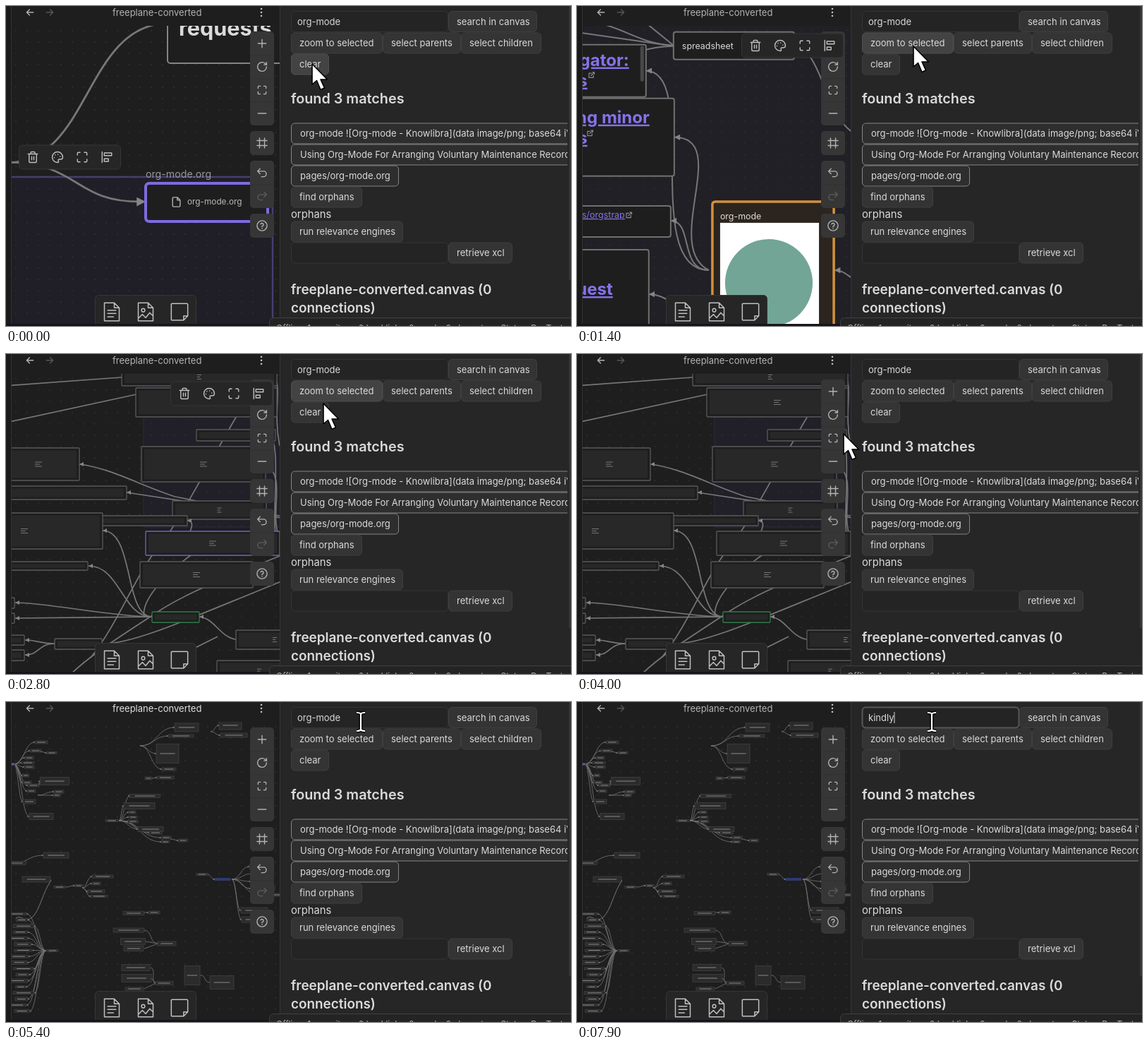
An HTML page that plays this animation: 801x453 px, repeating every 8000 ms.

```html
<!DOCTYPE html>
<html lang="en">
<head>
<meta charset="utf-8">
<title>Canvas search</title>
<style>
html, body { margin: 0; width: 801px; height: 453px; overflow: hidden; background: #1e1e1e; }
svg { display: block; }
text { font-family: Inter, sans-serif; font-size: 13px; fill: #dadada; white-space: pre; }
.edge { fill: none; stroke: #777; }
</style>
</head>
<body>
<svg id="stage" width="801" height="453" viewBox="0 0 801 453"></svg>
<script>
const LOOP = 8000;
const $ = id => document.getElementById(id);

// ---- drawing helpers ----
const rect = (x, y, w, h, fill, stroke = 'none', r = 0, sw = 1, extra = '') =>
  `<rect x="${x}" y="${y}" width="${w}" height="${h}" rx="${r}" fill="${fill}" stroke="${stroke}" stroke-width="${sw}" ${extra}/>`;
const text = (x, y, s, size = 13, fill = '#dadada', extra = '') =>
  `<text x="${x}" y="${y}" style="font-size:${size}px;fill:${fill}" ${extra}>${s}</text>`;
const edge = (d, w = 2) => `<path class="edge" d="${d}" stroke-width="${w}"/>`;
const head = (x, y, dir, size = 5) =>
  `<path d="M${x} ${y}l${-dir * size * 1.5} ${-size * .75}v${size * 1.5}z" fill="#858585"/>`;
const group = (id, body, extra = '') => `<g id="${id}" ${extra}>${body}</g>`;

// ---- icons, drawn in a 24 unit box ----
const ICONS = {
  plus: 'M4 12H20M12 4V20',
  minus: 'M4 12H20',
  reload: 'M21 12A9 9 0 1 1 18 5.3L21 8M21 3V8H16',
  fit: 'M3 8V5Q3 3 5 3H8M16 3H19Q21 3 21 5V8M21 16V19Q21 21 19 21H16M8 21H5Q3 21 3 19V16',
  grid: 'M7 2V22M17 2V22M2 7H22M2 17H22',
  undo: 'M8 14L3 9L8 4M3 9H15A5.5 5.5 0 0 1 15 20H11',
  redo: 'M16 14L21 9L16 4M21 9H9A5.5 5.5 0 0 0 9 20H13',
  help: 'M2 12A10 10 0 1 0 22 12A10 10 0 1 0 2 12M9 9A3 3 0 1 1 12 13V14M12 17V17.5',
  trash: 'M3 6H21M19 6V20Q19 22 17 22H7Q5 22 5 20V6M8 6V4Q8 2 10 2H14Q16 2 16 4V6M10 11V17M14 11V17',
  palette: 'M12 2A10 10 0 0 0 12 22C15 22 14 20 13.5 18.5C13 16.5 14 16 16 16H18C20 16 22 14.5 22 12A10 10 0 0 0 12 2M13 6.5V7M17 10.5V11M8 7.5V8M6 12.5V13',
  align: 'M3 2V22M7 4H21V9H7ZM7 15H15V20H7Z',
  back: 'M20 12H4M11 5L4 12L11 19',
  next: 'M4 12H20M13 5L20 12L13 19',
  file: 'M14 2H6Q4 2 4 4V20Q4 22 6 22H18Q20 22 20 20V8ZM14 2V8H20',
  doc: 'M15 1H3V23H21V7ZM15 1V7H21M7 10H17M7 14H17M7 18H14',
  image: 'M15 1H3V23H21V7ZM15 1V7H21M3 20L8 15L12 19L17 13L21 17M7 10A2 2 0 1 0 11 10A2 2 0 1 0 7 10',
  card: 'M3 2H21Q22 2 22 3V17L17 22H3Q2 22 2 21V3Q2 2 3 2M22 17H17V22',
  link: 'M18 13V21H3V6H11M15 3H21V9M21 3L10 14'
};
const icon = (name, cx, cy, size = 17, color = '#b3b3b3', w = 1.4) => {
  const k = size / 24;
  return `<path d="${ICONS[name]}" transform="translate(${cx - size / 2} ${cy - size / 2}) scale(${k})" fill="none"
    stroke="${color}" stroke-width="${w / k}" stroke-linecap="round" stroke-linejoin="round"/>`;
};

// ---- side panel ----
const button = (x, y, w, label, id = '') =>
  rect(x + .5, y + .5, w - 1, 29, '#343434', '#3f3f3f', 5, 1, id && `id="${id}"`) + text(x + 12, y + 19.5, label);
const field = (y, id) => rect(404.5, y + .5, 222, 29, '#242424', '#343434', 5, 1, `id="${id}"`);
const result = (y, w, label) =>
  rect(404.5, y + .5, w, 29, '#2e2e2e', '#858585', 5) + text(417, y + 19.5, label);

function panel() {
  return rect(388, 0, 413, 453, '#262626') + rect(388, 0, 1, 453, '#363636') + rect(798, 0, 3, 388, '#353535') +
    field(7, 'query') + text(413, 26.5, '', 13, '#dadada', 'id="typed"') +
    rect(0, 14, 1, 16, '#dadada', 'none', 0, 0, 'id="caret"') +
    button(627, 7, 126, 'search in canvas') +
    button(404, 37.5, 130, 'zoom to selected', 'zoomBtn') +
    button(534, 37.5, 111, 'select parents') + button(645, 37.5, 114, 'select children') +
    button(404, 67.5, 54, 'clear', 'clearBtn') +
    text(404, 138, 'found 3 matches', 19.8, '#dadada', 'font-weight="600"') +
    `<g clip-path="url(#rows)">` +
    result(165.5, 420, 'org-mode ![Org-mode - Knowlibra](data image/png; base64 iV') +
    result(195.5, 420, 'Using Org-Mode For Arranging Voluntary Maintenance Records Overview') +
    result(225.5, 152, 'pages/org-mode.org') + '</g>' +
    button(404, 255.5, 101, 'find orphans') + text(404, 300, 'orphans', 14.8) +
    button(404, 304.5, 159, 'run relevance engines') +
    field(334.5, 'second') + button(627, 334.5, 91, 'retrieve xcl') +
    text(404, 408, 'freeplane-converted.canvas (0', 18.9, '#dadada', 'font-weight="600"') +
    text(404, 434, 'connections)', 18.9, '#dadada', 'font-weight="600"') +
    rect(0, 450, 801, 3, '#17131a') +
    rect(373.5, 441.5, 440, 30, '#242424', '#404040', 6) +
    text(383, 460, 'Offline  1 repository  0 backlinks  0 words  0 characters  Status: Re  Test', 12, '#b3b3b3');
}

// ---- canvas controls ----
function chrome() {
  const block = (y, h) => rect(346, y, 34, h, '#363636', 'none', 5);
  const pad = [['plus', 53], ['reload', 86], ['fit', 119], ['minus', 152], ['grid', 194], ['undo', 236], ['redo', 269], ['help', 311]];
  const lines = [69.5, 102.5, 135.5, 252.5].map(y => rect(346, y, 34, 1, '#303030')).join('');
  return block(36, 133) + block(177, 34) + block(219, 67) + block(294, 34) + lines +
    pad.map(([n, y]) => icon(n, 363, y, n === 'fit' ? 15 : 17, n === 'redo' ? '#5c5c5c' : '#b3b3b3')).join('') +
    rect(126.5, 409.5, 143, 50, '#262626', '#363636', 5) +
    ['doc', 'image', 'card'].map((n, i) => icon(n, 150 + 48 * i, 433, 28, '#c0c0c0', 1.5)).join('');
}
const menu = (id, x, y) => group(id, rect(x + .5, y + .5, 144, 34, '#262626', '#363636', 5) +
  ['trash', 'palette', 'fit', 'align'].map((n, i) => icon(n, x + 20 + 35 * i, y + 17.5, 18, '#c0c0c0')).join(''));

const titleBar = () => rect(0, 0, 388, 28, '#1e1e1e') + icon('back', 34, 9, 14) + icon('next', 62, 9, 14, '#555') +
  text(151, 14, 'freeplane-converted', 13, '#b3b3b3', 'id="title"') +
  [4, 9, 14].map(y => `<circle cx="362" cy="${y}" r="1.3" fill="#c0c0c0"/>`).join('');

// ---- canvas scenes ----
function sceneNode() {
  return rect(-20, 242, 398, 260, '#201f27', '#453f70', 0, 2.5) + rect(-20, 242, 398, 260, 'url(#dots)') +
    edge('M0 222C120 222 110 28 229 24', 2.8) + edge('M0 221C105 222 95 277 190 277', 2.8) + head(198, 277, 1, 8.5) +
    rect(229, -30, 220, 111, '#1e1e1e', '#858585', 4, 2) +
    text(245, 42, 'requests', 30.6, '#dadada', 'font-weight="700"') +
    text(198, 243, 'org-mode.org', 14.2, '#999') +
    rect(198, 251, 173, 54, '#1e1e1e', '#7f6ae0', 5, 4) +
    icon('file', 241.5, 277.5, 16) + text(257, 281, 'org-mode.org', 11.8, '#b8b8b8');
}

function sceneCards() {
  const box = (x, y, w, h) => rect(x, y, w, h, '#1e1e1e', '#707070', 3, 2);
  const link = (x, y, s, size, weight = 700) =>
    text(x, y, s, size, '#8672ea', `text-anchor="end" text-decoration="underline" font-weight="${weight}"`);
  const out = (x, y) => icon('link', x, y, 10, '#8a8a8a', 1.2);
  const join = ['M98 92C175 92 90 374 187 374', 'M138 186C220 186 120 340 187 374', 'M133 304C165 304 145 374 187 374',
    'M102 408C120 408 130 418 145 425', 'M365 374C380 374 385 385 400 390', 'M308 57C350 62 350 165 400 184',
    'M-10 20C60 20 80 54 137 56', 'M-10 36L137 57', 'M-10 85C60 84 80 58 137 57', 'M90 18L137 56'];
  const tips = [[98, 92], [138, 186], [133, 304], [102, 408], [365, 374]];
  return rect(-400, -400, 1300, 1300, '#202026') + rect(-400, -400, 1300, 1300, 'url(#dots)') +
    join.map(d => edge(d)).join('') + tips.map(([x, y]) => head(x, y, -1, 5.5)).join('') +
    box(137, 37, 171, 39) + text(149, 61, 'spreadsheet', 12.4) +
    box(-80, 55, 178, 74) + rect(90, 57, 5, 50, '#484848', 'none', 2) +
    link(74, 85, 'gator:', 24) + link(15, 114, 's', 24) + out(21, 98) +
    box(-80, 131, 218, 110) + link(103, 166, 'ng minor', 24) + link(15, 195, 's', 24) + out(19, 180) +
    box(-80, 283, 213, 44) + link(68, 300, 's/orgstrap', 12.5, 400) + out(74, 296) +
    box(-80, 345, 182, 130) + link(51, 409, 'uest', 24) +
    rect(192, 277, 172, 220, '#2c251f', '#d3903c', 4, 3.5) + text(203, 302, 'org-mode', 12.4) +
    rect(203, 307, 140, 180, '#fff') + '<circle cx="272" cy="392" r="62" fill="#72a596"/>';
}

function sceneMap() {
  const boxes = [[164, 20, 220, 25], [184, 48, 200, 41], [270, 107, 112, 16], [192, 131, 176, 50], [-60, 133, 164, 46, 46],
    [-60, 187, 231, 19], [236, 208, 133, 26], [120, 229, 137, 14], [-60, 225, 197, 51, 26], [190, 294, 160, 37], [-60, 294, 176, 12],
    [-60, 345, 72, 15], [-60, 367, 72, 14], [-60, 398, 86, 14], [-60, 419, 86, 15], [69, 403, 67, 15], [326, 391, 110, 27], [299, 434, 120, 30]];
  const card = ([x, y, w, h, mid = x + w / 2], stroke = '#5a5a5a', id = '') => {
    const c = y + h / 2, n = h > 30 ? 5 : 3;
    return rect(x, y, w, h, '#1e1e1e', stroke, 1, 1.3, id && `id="${id}"`) + rect(x + 4, y + 3.5, w - 8, h - 7, '#282828') +
      (h > 20 ? edge(`M${mid - n} ${c - 3}h${n * 2}m${-n * 2} 3h${n * 1.4}m${-n * 1.4} 3h${n * 2}`, 1) : '');
  };
  const hub = [[117, 300], [137, 250], [13, 352], [13, 374]];
  const lines = ['M0 45L164 33', 'M0 97L190 56', 'M104 156C150 162 190 186 240 202L390 232', 'M171 196L388 229', 'M388 264C370 270 395 120 372 114',
    'M257 236C266 236 264 244 261 251', 'M69 410C48 410 45 405 27 405', 'M69 410C45 410 48 426 27 426', 'M274 372C296 374 302 400 326 404',
    'M90 455C120 425 170 395 215 365S330 310 390 285', 'M120 430C160 380 185 310 215 275S290 150 327 88',
    'M196 372C190 345 240 300 262 285', 'M136 410C180 412 270 370 390 322', 'M380 30C392 50 378 80 388 130', 'M368 156C400 175 370 230 390 265', 'M190 455L300 400'];
  const tips = [...hub, [104, 156], [171, 196], [27, 405], [27, 426], [274, 372], [257, 236]];
  return rect(195, 30, 230, 215, '#211f28', '#2e2b3c') + rect(195, 30, 230, 215, 'url(#dots)') +
    group('mapEdges', lines.map(d => `<path class="edge" d="${d}"/>`).join('') +
      hub.map(([x, y]) => `<path class="edge" d="M207 372C${150 + x / 8} 372 ${x + 45} ${y} ${x} ${y}"/>`).join('')) +
    boxes.map(b => card(b)).join('') + card([198, 251, 190, 34], '#7362d0', 'picked') + card([207, 365, 67, 15], '#2f7d4a') +
    group('mapTips', tips.map(([x, y]) => head(x, y, -1, 4)).join(''));
}

function sceneFar() {
  const chip = ([x, y, w = 12, h = 4], fill = '#2b2b2b') =>
    rect(x - w / 2, y - h / 2, w, h, fill, '#4a4a4a', 0, .6) + rect(x - w * .33, y - .4, w * .66, .8, '#a0a0a0');
  const chips = list => list.map(n => chip(n)).join('');
  const fan = (x, y, list) => list.map(n => {
    const end = n[0] + (n[0] > x ? -1 : 1) * (n[2] || 12) / 2, m = (x + end) / 2;
    return edge(`M${x} ${y}C${m} ${y} ${m} ${n[1]} ${end} ${n[1]}`, .8) + head(end, n[1], n[0] > x ? 1 : -1, 1.5);
  }).join('') + chips(list);
  // ragged column of nodes at the lower left
  const column = Array.from({ length: 17 }, (_, i) =>
    [14 + 11 * Math.abs(Math.sin(i * 2.3)), 300 + i * 8.6, 14 + 16 * Math.abs(Math.cos(i * 1.7)), 3 + i % 3]);
  return fan(11, 88, [[50, 57, 18], [42, 69, 16], [33, 79], [31, 86, 18, 3], [33, 92, 14], [28, 104, 9], [30, 114], [39, 118, 16], [36, 126], [33, 141, 18, 6], [50, 162, 34, 9]]) +
    fan(48, 70, [[65, 72, 14, 3]]) + fan(46, 118, [[69, 112, 41, 11]]) + fan(45, 132, [[75, 127, 14], [72, 132, 10]]) + chip([8, 88, 10, 3], '#30408f') +
    fan(190, 62, [[256, 36, 34, 12], [248, 48, 36], [229, 73, 32, 27], [231, 95, 20]]) +
    fan(290, 42, [[318, 33, 32, 12], [323, 47, 38, 6]]) + fan(206, 108, [[226, 107, 24]]) + chip([202, 108, 10]) +
    fan(160, 168, [[197, 133, 43, 5], [189, 147, 44, 9], [179, 156, 10], [180, 163, 12, 3], [180, 169, 14], [205, 180, 36, 7], [212, 185, 18], [227, 192, 14], [226, 198, 11, 3]]) +
    chip([150, 168, 18, 3]) + fan(233, 194, [[251, 196, 13, 4]]) +
    fan(8, 229, [[71, 217, 36, 8]]) + chip([15, 228, 26, 5]) + chip([43, 251, 40, 8]) +
    edge('M64 252C52 270 48 294 38 304S20 300 14 306', 1) + fan(84, 262, [[103, 260, 11, 3]]) + chip([76, 262, 16, 3]) +
    fan(108, 263, [[137, 247, 30], [128, 257], [128, 268, 24], [132, 275, 24, 3]]) +
    fan(285, 244, [[307, 251, 22, 3]]) + chip([278, 244, 16, 3]) +
    fan(320, 251, [[360, 233, 30, 6], [364, 243, 30, 5], [362, 254, 30], [364, 264, 34, 6], [376, 273, 36], [352, 295, 38, 8], [350, 308, 32, 8]]) +
    rect(296, 249.5, 22, 3, '#26398c') + fan(190, 298, [[210, 298, 16]]) + chip([181, 299, 30, 5]) +
    edge('M196 323C208 324 203 342 216 342M198 339L216 342M196 349L216 342', .8) +
    chips([[174, 323, 44, 6], [180, 339, 35, 9], [181, 349, 28, 7], [228, 342, 26, 6]]) +
    chips([[184, 376, 40, 9], [185, 391, 42, 11], [224, 398, 26, 5], [182, 406, 26]]) +
    edge('M205 376C214 378 204 397 212 398M206 391L212 398M196 406L212 398', .8) +
    edge('M275 387C284 386 280 397 289 397', .8) + chip([264, 387, 22, 27]) + chip([306, 397, 34, 19]) +
    fan(57, 352, column) + chip([66, 352, 16, 3]);
}

// ---- pointers ----
const bar = 'M-6 -13Q-1 -13 0 -11Q1 -13 6 -13M0 -11V11M-6 13Q-1 13 0 11Q1 13 6 13';
const pointer = group('arrow', '<path d="M0 0V29L6.5 23.5L12 36.5L17.5 34L12 22H21.5Z" fill="#fff" stroke="#000" stroke-width="1.6" stroke-linejoin="round"/>') +
  group('beam', `<path d="${bar}" fill="none" stroke="#000" stroke-width="5"/><path d="${bar}" fill="none" stroke="#fff" stroke-width="2.2"/>`,
    'transform="translate(503 28)"');

$('stage').innerHTML = `<defs>
  <clipPath id="view"><rect x="8" y="28" width="380" height="425"/></clipPath>
  <clipPath id="rows"><rect x="404" y="160" width="392" height="100"/></clipPath>
  <pattern id="dots" x="12" y="33" width="16" height="16" patternUnits="userSpaceOnUse"><circle cx="2" cy="2" r=".9" fill="#303030"/></pattern></defs>` +
  rect(0, 0, 801, 453, '#1e1e1e') +
  group('canvas', rect(8, 28, 380, 425, 'url(#dots)') + group('node', sceneNode()) + group('cards', sceneCards()) +
    group('map', sceneMap()) + group('far', sceneFar()) + chrome() + menu('menuLow', 18, 196.5) + menu('menuHigh', 233, 38.5), 'clip-path="url(#view)"') +
  titleBar() + rect(0, 0, 7, 453, '#1a1a1a') + rect(7, 0, 1, 453, '#333') + panel() + pointer;

// ---- motion ----
const lerp = (a, b, k) => a + (b - a) * k;
function track(t, keys) {
  const i = keys.findIndex(k => k[0] > t);
  if (i < 0) return keys[keys.length - 1].slice(1);
  if (i === 0) return keys[0].slice(1);
  const a = keys[i - 1], b = keys[i], k = (t - a[0]) / (b[0] - a[0]);
  return a.slice(1).map((v, j) => lerp(v, b[j + 1], k));
}
const POINTER = [[300, 434, 82], [900, 477, 57], [2700, 477, 57], [2800, 450, 70], [3000, 434, 80], [3600, 434, 80],
  [4000, 378, 113], [4300, 262, 113], [4500, 262, 113], [4900, 384, 70], [5000, 384, 70], [5300, 490, 28]];
// log2 of the scale, then the place of the hub node
const CAMERA = [[1400, 1.38, 278, 374], [2000, .1, 227.5, 391.2], [2400, 0, 240, 372], [4500, 0, 240, 372],
  [4900, -1.5, 100, 358], [5000, -1.5, 100, 358], [5400, -2, 66, 352]];
const TYPING = [[0, 'org-mode'], [6700, 'org-'], [6900, 'org'], [7000, ''], [7300, 'k'], [7400, 'ki'],
  [7600, 'kin'], [7700, 'kind'], [7800, 'kindl'], [7900, 'kindly']];

const show = (id, on) => $(id).style.display = on ? '' : 'none';
const place = (id, s, x, y, ax, ay) => $(id).setAttribute('transform', `translate(${x - ax * s} ${y - ay * s}) scale(${s})`);
const paint = (id, fill, stroke) => { $(id).setAttribute('fill', fill); $(id).setAttribute('stroke', stroke); };
const hover = (id, on) => paint(id, on ? '#434343' : '#343434', on ? '#505050' : '#3f3f3f');

function draw(t) {
  const [zoom, hx, hy] = track(t, CAMERA), s = 2 ** zoom;
  const slide = track(t, [[1000, 0], [1400, 1]])[0], q = slide * (2 - slide);
  show('node', t < 1400);
  $('node').setAttribute('transform', `translate(${-400 * q} 0)`);
  show('cards', t >= 1100 && t < 1700);
  place('cards', s / 2.6, hx + 400 * (1 - q), hy, 278, 374);
  show('map', t >= 1700 && s > .5);
  place('map', s, hx, hy, 240, 372);
  show('far', t >= 4600 && s <= .5);
  place('far', s * 4, hx, hy, 66, 352);

  const settled = t >= 2400;
  $('mapEdges').setAttribute('stroke-width', settled ? 1.7 : 1);
  show('mapTips', settled);
  $('picked').setAttribute('stroke', t < 3400 ? '#7362d0' : '#5a5a5a');
  show('menuLow', t < 1100);
  show('menuHigh', t >= 1100 && t < 3400);
  $('title').style.fill = t >= 4600 && t < 5600 ? '#e0e0e0' : '#b3b3b3';

  hover('clearBtn', t < 600 || t >= 2900 && t < 3700);
  hover('zoomBtn', t >= 700 && t < 2900);
  const [px, py] = track(t, POINTER);
  $('arrow').setAttribute('transform', `translate(${px} ${py})`);
  show('arrow', t < 5400);
  show('beam', t >= 5400);

  const focus = t >= 5600;
  $('query').setAttribute('stroke', focus ? '#585858' : '#343434');
  $('query').setAttribute('stroke-width', focus ? 2 : 1);
  const typed = $('typed');
  typed.textContent = TYPING.filter(k => k[0] <= t).pop()[1];
  show('caret', focus);
  $('caret').setAttribute('x', 413 + (typed.textContent ? typed.getComputedTextLength() : 0));
}

const start = performance.now();
function frame() {
  const t = (performance.now() - start) % LOOP;
  draw(Math.floor(t / 100) * 100);
  requestAnimationFrame(frame);
}
frame();
</script>
</body>
</html>
```
